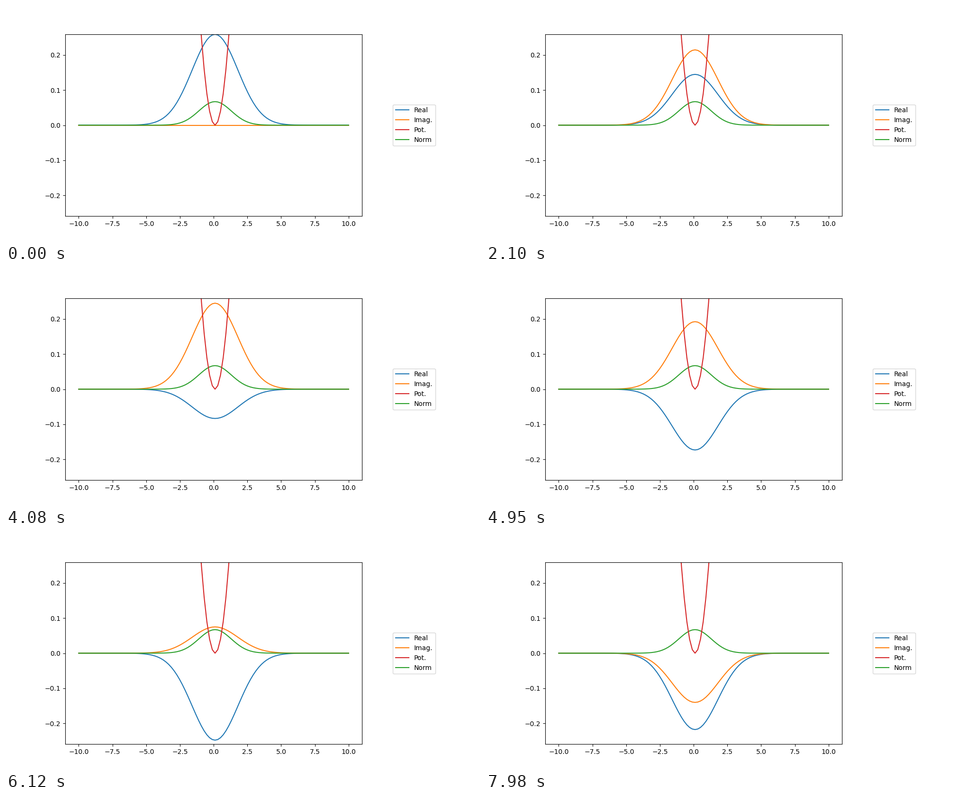
Write a matplotlib script that moves like this. It is 1000x500 px and loops after 8000 ms.

```python
import numpy as np
import matplotlib.pyplot as plt
from matplotlib.animation import FuncAnimation

LOOP_MS = 8000
FRAMES = 267
PERIOD = 450  # frames per full turn of the phase
POINTS = 100
STEP = 0.1


def ground_state(potential):
    """Lowest eigenvector of -1/2 d2/dx2 + V on the grid."""
    hop = np.eye(POINTS, k=1) + np.eye(POINTS, k=-1)
    kinetic = (2 * np.eye(POINTS) - hop) / (2 * STEP**2)
    _, states = np.linalg.eigh(kinetic + np.diag(potential))
    return np.abs(states[:, 0])


x = np.linspace(-10, 10, POINTS)
pot = ((np.arange(POINTS) - POINTS // 2) * STEP) ** 2
psi0 = ground_state(pot)

fig, (ax, side) = plt.subplots(
    1, 2, figsize=(10, 5), dpi=100, gridspec_kw={"width_ratios": [8, 1]}
)
real, = ax.plot(x, psi0, "C0", label="Real")
imag, = ax.plot(x, 0 * psi0, "C1", label="Imag.")
norm, = ax.plot(x, psi0**2, "C2", label="Norm")
well, = ax.plot(x, pot, "C3", label="Pot.")
ax.set_ylim(-psi0.max(), psi0.max())

side.axis("off")
side.legend(handles=[real, imag, well, norm], loc="center")


def update(frame):
    psi = psi0 * np.exp(2j * np.pi * frame / PERIOD)
    real.set_ydata(psi.real)
    imag.set_ydata(psi.imag)
    norm.set_ydata(np.abs(psi) ** 2)
    return real, imag, norm


anim = FuncAnimation(fig, update, frames=FRAMES, interval=LOOP_MS / FRAMES,
                     repeat=True, repeat_delay=0)
plt.show()
```
